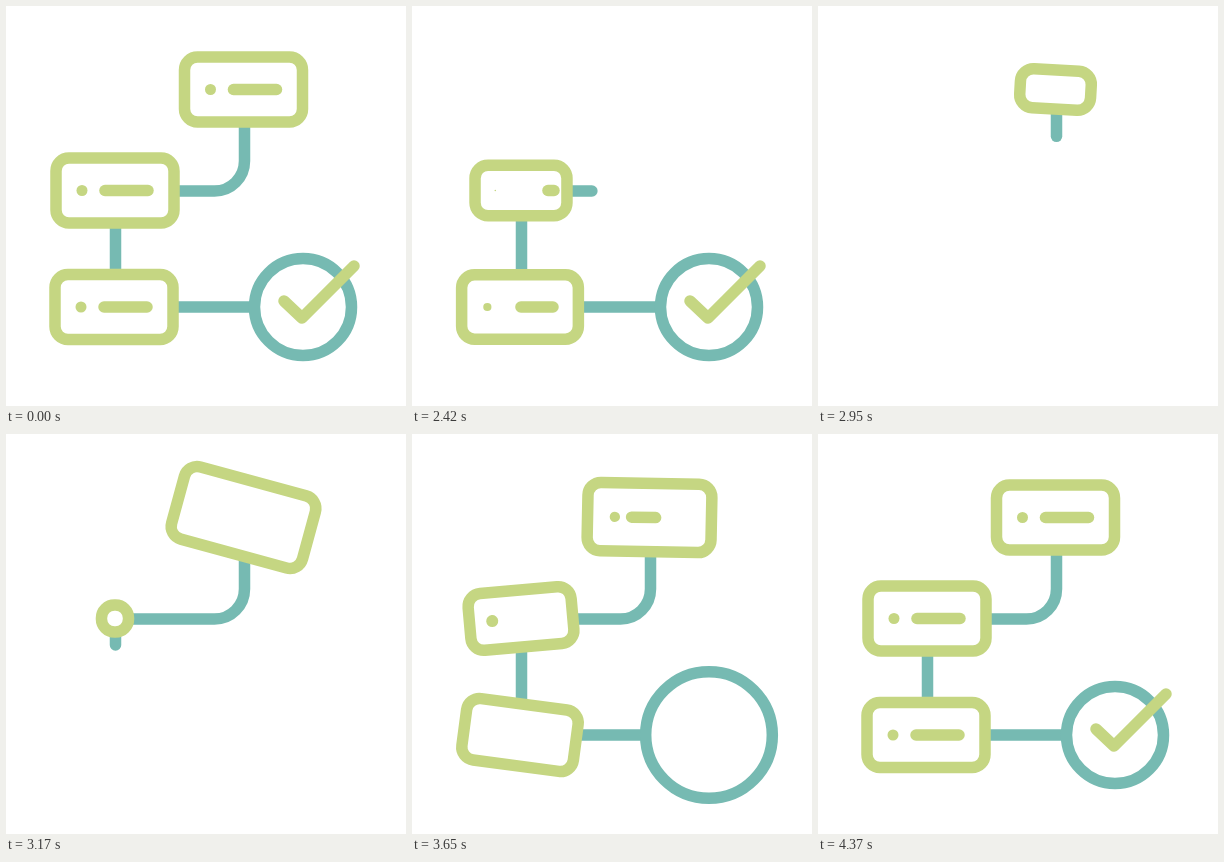
Write an HTML page with a canvas that moves like this. It is 400x400 px and loops after 4.42 s.

```html
<!DOCTYPE html>
<html lang="en">
<head>
<meta charset="utf-8">
<title>Workflow</title>
<style>
  html, body { margin: 0; width: 100%; height: 100%; overflow: hidden; background: #fff; }
  canvas { display: block; width: 400px; height: 400px; }
</style>
</head>
<body>
<canvas id="stage" width="400" height="400"></canvas>
<script>
const ctx = document.getElementById('stage').getContext('2d');
const LOOP = 4420, TURNAROUND = 2890, SWING = 470;
const GREEN = '#c5d682', TEAL = '#76bab2', STROKE = 11.5;

const progress = (t, start, end) => Math.min(1, Math.max(0, (t - start) / (end - start)));
const easeIn = p => p * p;
const easeOut = p => 1 - (1 - p) ** 2;
const mix = (a, b, p) => a + (b - a) * p;

// Rises from 0 to `top`, then swings around `rest` until it has settled
function spring(t, { start, peak, top, rest, settle, damping }) {
  if (t < peak) return top * easeOut(progress(t, start, peak));
  const fade = (1 - progress(t, peak, peak + settle)) ** damping;
  return rest + (top - rest) * fade * Math.cos(2 * Math.PI * (t - peak) / SWING);
}

// Box springs run on the time since that box's entrance
const SIZE = { start: 0, peak: 255, top: 1.185, rest: 1, settle: 800, damping: 1 };
const TILT = { start: 45, peak: 330, top: 15.5, rest: 0, settle: 780, damping: 3 };
const DOT = { start: 445, peak: 575, top: 8.4, rest: 5.5, settle: 500, damping: 4 };
const RING = { start: 3475, peak: 3690, top: 1.35, rest: 1, settle: 680, damping: 1.5 };

const boxes = [
  { x: 237.5, y: 83.5, in: 2875, out: 2120 },
  { x: 109, y: 184.5, in: 3145, out: 2280 },
  { x: 108, y: 301, in: 3255, out: 2390 }
];
const links = [
  { path: 'M238.5 83.5V155A30 30 0 0 1 208.5 185H109', length: 218.2, in: [2900, 3140], out: [2150, 2480] },
  { path: 'M109.5 184.5V301', length: 116.5, in: [3137, 3290], out: [2300, 2570] },
  { path: 'M108 301H297', length: 189, in: [3270, 3490], out: [2400, 2670] }
];
const check = { path: 'M278 295L296 312L348 260', length: 98.3, in: [3800, 4120], out: [2500, 2820] };
for (const line of [...links, check]) line.shape = new Path2D(line.path);

function drawTrimmed(line, color, t) {
  const leaving = t < TURNAROUND;
  const from = leaving ? easeIn(progress(t, ...line.out)) : 0;
  const to = leaving ? 1 : progress(t, ...line.in);
  if (to <= from) return;
  ctx.strokeStyle = color;
  ctx.setLineDash([(to - from) * line.length + .5, 1e4]);
  ctx.lineDashOffset = -from * line.length;
  ctx.stroke(line.shape);
  ctx.setLineDash([]);
}

function boxPose(box, t) {
  if (t < box.in && t < TURNAROUND) {
    const gone = easeIn(progress(t, box.out - 100, box.out + 160));
    return {
      scale: 1 - easeIn(progress(t, box.out, box.out + 300)),
      tilt: 0, dot: 5.5 * (1 - gone), from: mix(-10, 33, gone), to: 33
    };
  }
  const u = t - box.in, drawn = easeOut(progress(u, 665, 995));
  return {
    scale: spring(u, SIZE), tilt: spring(u, TILT), dot: spring(u, DOT),
    from: mix(-28, -10, drawn), to: mix(-28, 33, drawn)
  };
}

function drawBox(box, t) {
  const { scale, tilt, dot, from, to } = boxPose(box, t);
  if (scale <= 0) return;
  const w = 118 * scale, h = Math.max(65 * scale, Math.min(w, 27));

  ctx.save();
  ctx.translate(box.x, box.y);
  ctx.rotate(tilt * Math.PI / 180);
  ctx.strokeStyle = GREEN;
  ctx.fillStyle = '#fff';
  ctx.beginPath();
  ctx.roundRect(-w / 2, -h / 2, w, h, Math.min(13, w / 2, h / 2));
  ctx.fill();
  ctx.stroke();

  ctx.fillStyle = GREEN;
  ctx.beginPath();
  ctx.arc(-33 * scale, 0, dot, 0, 2 * Math.PI);
  ctx.fill();
  if (to > from) {
    ctx.beginPath();
    ctx.moveTo(from, 0);
    ctx.lineTo(to, 0);
    ctx.stroke();
  }
  ctx.restore();
}

function drawRing(t) {
  const scale = t < TURNAROUND ? 1 - easeIn(progress(t, 2500, 2885)) : spring(t, RING);
  if (scale <= 0) return;
  ctx.beginPath();
  ctx.arc(297, 301, 48.5 * scale, 0, 2 * Math.PI);
  ctx.fillStyle = '#fff';
  ctx.strokeStyle = TEAL;
  ctx.fill();
  ctx.stroke();
}

function draw() {
  const t = performance.now() % LOOP;
  ctx.fillStyle = '#fff';
  ctx.fillRect(0, 0, 400, 400);
  ctx.lineWidth = STROKE;
  ctx.lineCap = ctx.lineJoin = 'round';
  links.forEach(link => drawTrimmed(link, TEAL, t));
  boxes.forEach(box => drawBox(box, t));
  drawRing(t);
  drawTrimmed(check, GREEN, t);
  requestAnimationFrame(draw);
}
draw();
</script>
</body>
</html>
```
